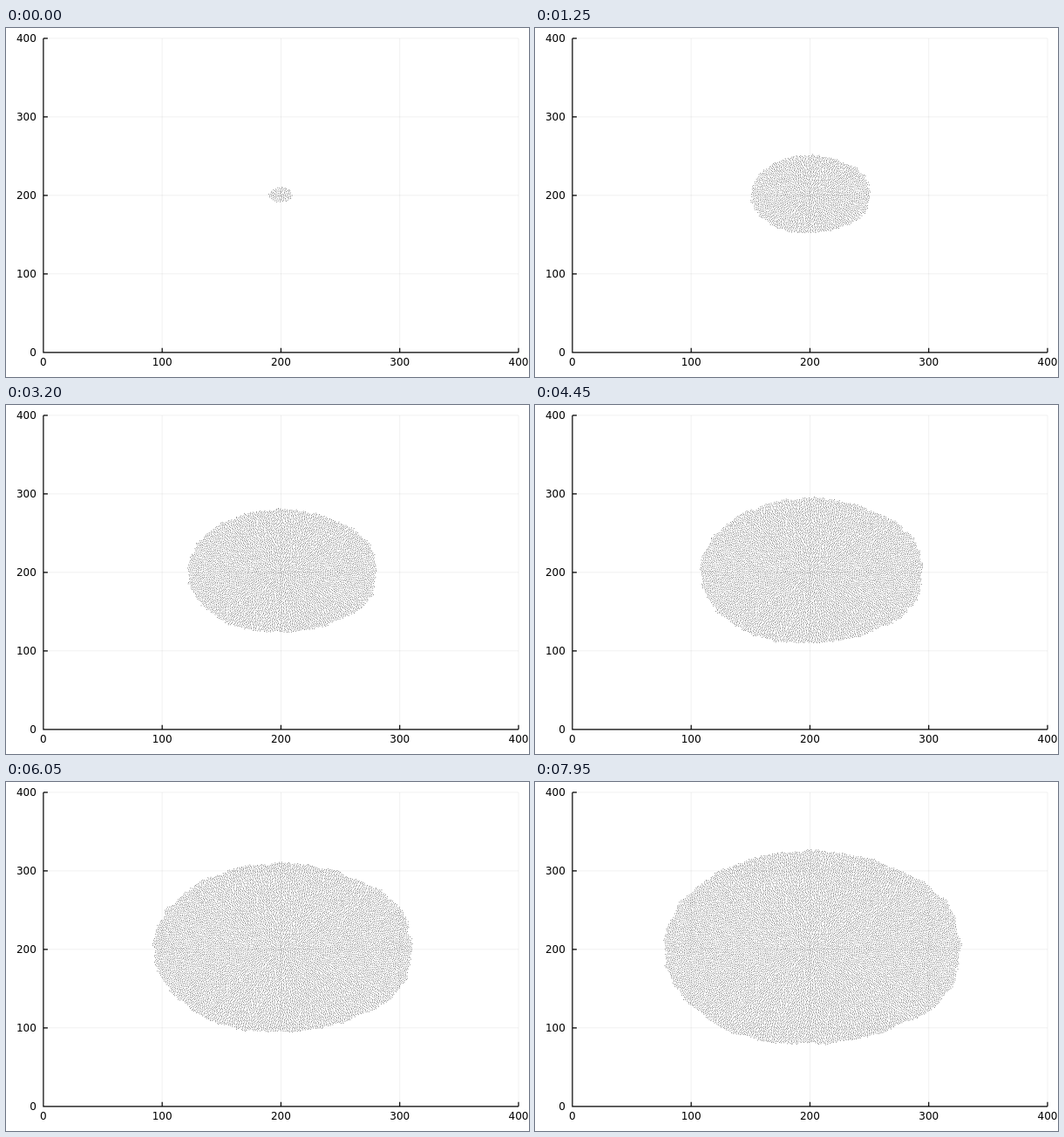
These frames come from a looping animation (600x400 px, 8 s). An HTML page with a canvas:

```html
<!DOCTYPE html>
<html lang="en">
<head>
<meta charset="utf-8">
<title>Growing cluster</title>
<style>
  html, body { margin: 0; width: 100%; height: 100%; overflow: hidden; background: #fff; }
  svg, canvas { position: absolute; left: 0; top: 0; width: 600px; height: 400px; }
  text { font: 12px "DejaVu Sans", sans-serif; fill: #000; }
  .grid { stroke: #000; stroke-opacity: .1; stroke-width: .6; }
  .axis { stroke: #000; stroke-width: 1.2; fill: none; }
</style>
</head>
<body>
<svg id="plot" viewBox="0 0 600 400"></svg>
<canvas id="dots" width="600" height="400"></canvas>
<script>
const STEP_MS = 50, STEPS = 160, PER_STEP = 100;
const TOTAL = STEPS * PER_STEP;
const DOT = 0.68;
const px = x => 42.9 + x * 1.3627;
const py = y => 371.8 - y * 0.8998;

function drawAxes() {
  let grid = '', ticks = '', labels = '';
  for (let v = 0; v <= 400; v += 100) {
    const x = px(v), y = py(v);
    if (v) grid += `M${x} ${py(0)}V${py(400)}M${px(0)} ${y}H${px(400)}`;
    ticks += `M${x} ${py(0)}v-5M${px(0)} ${y}h5`;
    labels += `<text x="${x}" y="387" text-anchor="middle">${v}</text>` +
              `<text x="34.8" y="${Math.round(y + 4.2)}" text-anchor="end">${v}</text>`;
  }
  document.getElementById('plot').innerHTML =
    `<path class="grid" d="${grid}"/>` +
    `<path class="axis" d="M${px(0)} ${py(400)}V${py(0)}H${px(400)}${ticks}"/>` + labels;
}

function makeRandom(seed) {
  return () => {
    seed = (seed + 0x6D2B79F5) | 0;
    let t = Math.imul(seed ^ (seed >>> 15), 1 | seed);
    t = (t + Math.imul(t ^ (t >>> 7), 61 | t)) ^ t;
    return ((t ^ (t >>> 14)) >>> 0) / 4294967296;
  };
}
const random = makeRandom(11);

// Close packing of points, grown outward from one seed with unit spacing.
function packPoints(count) {
  const size = 300, cell = Math.SQRT1_2, half = size * cell / 2;
  const cells = new Array(size * size);
  const points = [];
  const index = v => Math.floor((v + half) / cell);
  const add = p => {
    points.push(p);
    cells[index(p.y) * size + index(p.x)] = p;
  };
  const isFree = (x, y) => {
    const cx = index(x), cy = index(y);
    if (cx < 2 || cy < 2 || cx > size - 3 || cy > size - 3) return false;
    for (let j = cy - 2; j <= cy + 2; j++)
      for (let i = cx - 2; i <= cx + 2; i++) {
        const q = cells[j * size + i];
        if (q && (q.x - x) ** 2 + (q.y - y) ** 2 < 1) return false;
      }
    return true;
  };
  add({ x: 0, y: 0 });
  for (let k = 0; k < points.length && points.length < count; k++) {
    const p = points[k];
    for (let n = 0; n < 24; n++) {
      const a = random() * Math.PI * 2, r = 1 + random() * 0.06;
      const x = p.x + r * Math.cos(a), y = p.y + r * Math.sin(a);
      if (isFree(x, y)) add({ x, y });
    }
  }
  return points;
}

// Outline radius every 30 degrees, counter-clockwise from the right.
const OUTLINE = [126, 129, 124.5, 125, 124.5, 123, 122.5, 123, 125, 121.5, 122.5, 129];

function outline(angle) {
  const u = (angle / (Math.PI / 6) + 12) % 12, i = Math.floor(u);
  const s = (1 - Math.cos((u - i) * Math.PI)) / 2;
  const smooth = OUTLINE[i] * (1 - s) + OUTLINE[(i + 1) % 12] * s;
  return smooth + 0.8 * Math.sin(17 * angle + 1) + 0.7 * Math.sin(29 * angle);
}

function growCluster() {
  const points = packPoints(19500);
  for (const p of points) {
    const edge = outline(Math.atan2(p.y, p.x)) / 124.5;
    p.order = Math.hypot(p.x, p.y) / edge + (random() - 0.5) * 1.2;
  }
  points.sort((a, b) => a.order - b.order);
  const scale = 124.5 / points[TOTAL - 1].order;
  return points.slice(0, TOTAL).map(p => ({
    x: px(199.9 + p.x * scale) - DOT / 2,
    y: py(200.9 + p.y * scale) - DOT / 2
  }));
}

drawAxes();
const cluster = growCluster();
const ctx = document.getElementById('dots').getContext('2d');
let drawn = 0;

function render(time) {
  const step = Math.floor(time / STEP_MS) % STEPS;
  const count = (step + 1) * PER_STEP;
  if (count < drawn) {
    ctx.clearRect(0, 0, 600, 400);
    drawn = 0;
  }
  for (; drawn < count; drawn++) ctx.fillRect(cluster[drawn].x, cluster[drawn].y, DOT, DOT);
}

const start = performance.now();
function tick() {
  render(performance.now() - start);
  requestAnimationFrame(tick);
}
tick();
</script>
</body>
</html>
```
